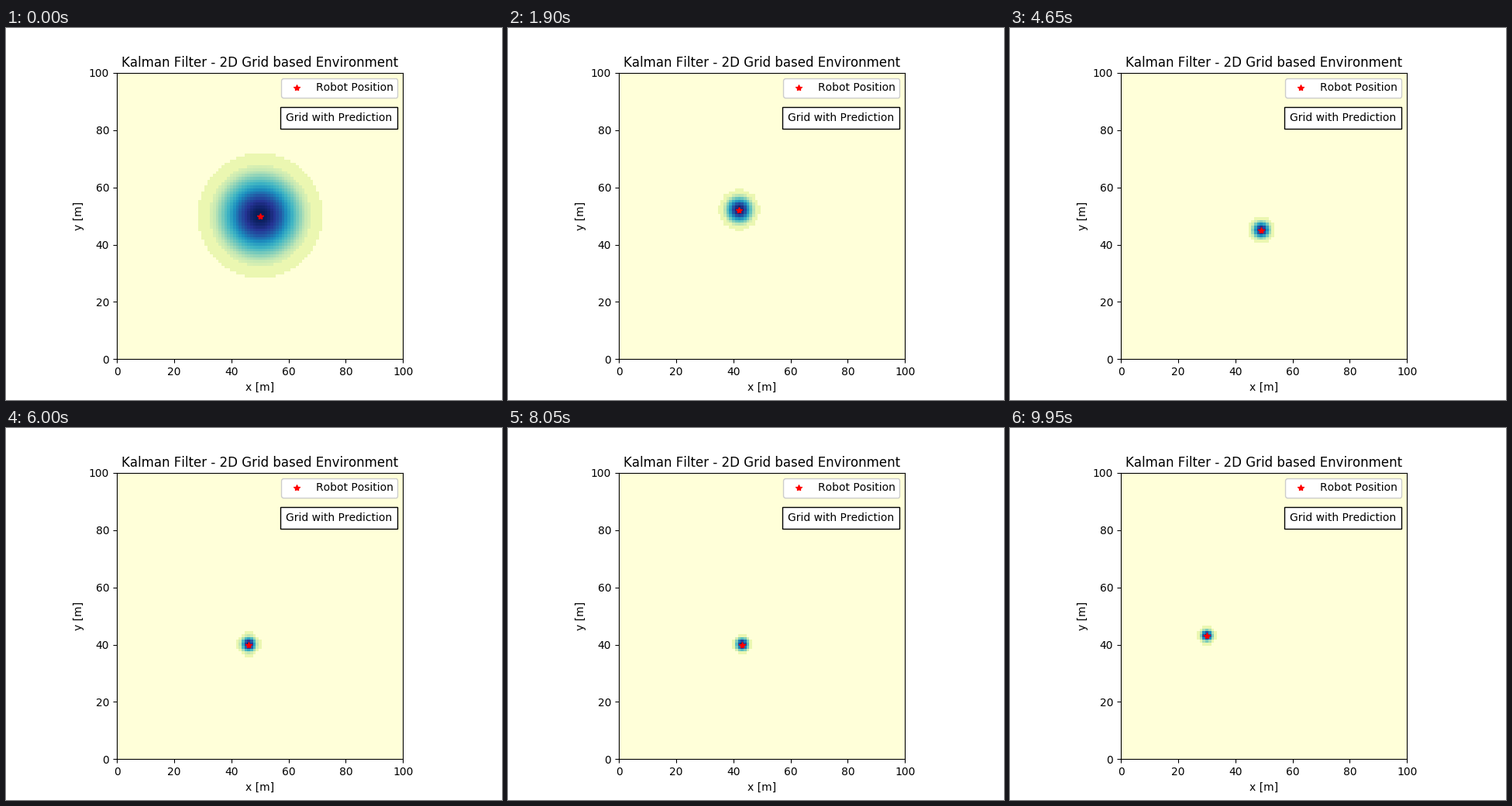
Animation, 640 px wide and 480 px high, one loop 10 s. Source, as a matplotlib script:

```python
import numpy as np
import matplotlib.pyplot as plt
from matplotlib.animation import FuncAnimation

FRAMES = 200
INTERVAL = 50
SIZE = 100

# Turning points of the robot's walk: (step, x, y)
TURNS = [(0, 50, 50), (15, 47, 49), (22, 50, 46), (38, 42, 52),
         (68, 45, 49), (80, 50, 47), (120, 46, 40), (138, 44, 34),
         (161, 43, 40), (180, 35, 38), (199, 30, 43)]

cols, rows = np.meshgrid(np.arange(SIZE + 1), np.arange(SIZE + 1))


def position(step):
    """Grid cell of the robot at a step."""
    steps, *axes = zip(*TURNS)
    return [round(np.interp(step, steps, values)) for values in axes]


def variance(step):
    """Each measurement adds the same amount of information."""
    return 92 / (1 + 0.22 * step)


def belief(step):
    """Gaussian around the robot, with its tail as one flat ring."""
    x, y = position(step)
    dist2 = (cols - x) ** 2 + (rows - y) ** 2
    p = np.exp(-dist2 / (2 * variance(step)))
    return np.select([p < 0.078, p < 0.186], [0, 0.13], p)


plt.rcParams["text.kerning_factor"] = 6
fig, ax = plt.subplots(figsize=(6.4, 4.8), dpi=100)
fig.subplots_adjust(right=0.8988, top=0.8792)

grid = ax.imshow(belief(0), cmap="YlGnBu", vmin=0, vmax=1,
                 origin="lower", interpolation="nearest")
robot, = ax.plot([50], [50], "r*", label="Robot Position")

ax.set_xlim(0, SIZE)
ax.set_ylim(0, SIZE)
ax.set_xlabel("x [m]")
ax.set_ylabel("y [m]")
ax.set_title("Kalman Filter - 2D Grid based Environment")
ax.legend(loc="upper right", framealpha=1)
ax.text(0.9615, 0.861, "Grid with Prediction", transform=ax.transAxes,
        ha="right", va="top",
        bbox=dict(boxstyle="square,pad=0.5", facecolor="white",
                  edgecolor="black"))


def update(step):
    x, y = position(step)
    grid.set_data(belief(step))
    robot.set_data([x], [y])
    return grid, robot


anim = FuncAnimation(fig, update, frames=FRAMES, interval=INTERVAL,
                     repeat=True, repeat_delay=0)
plt.show()
```
